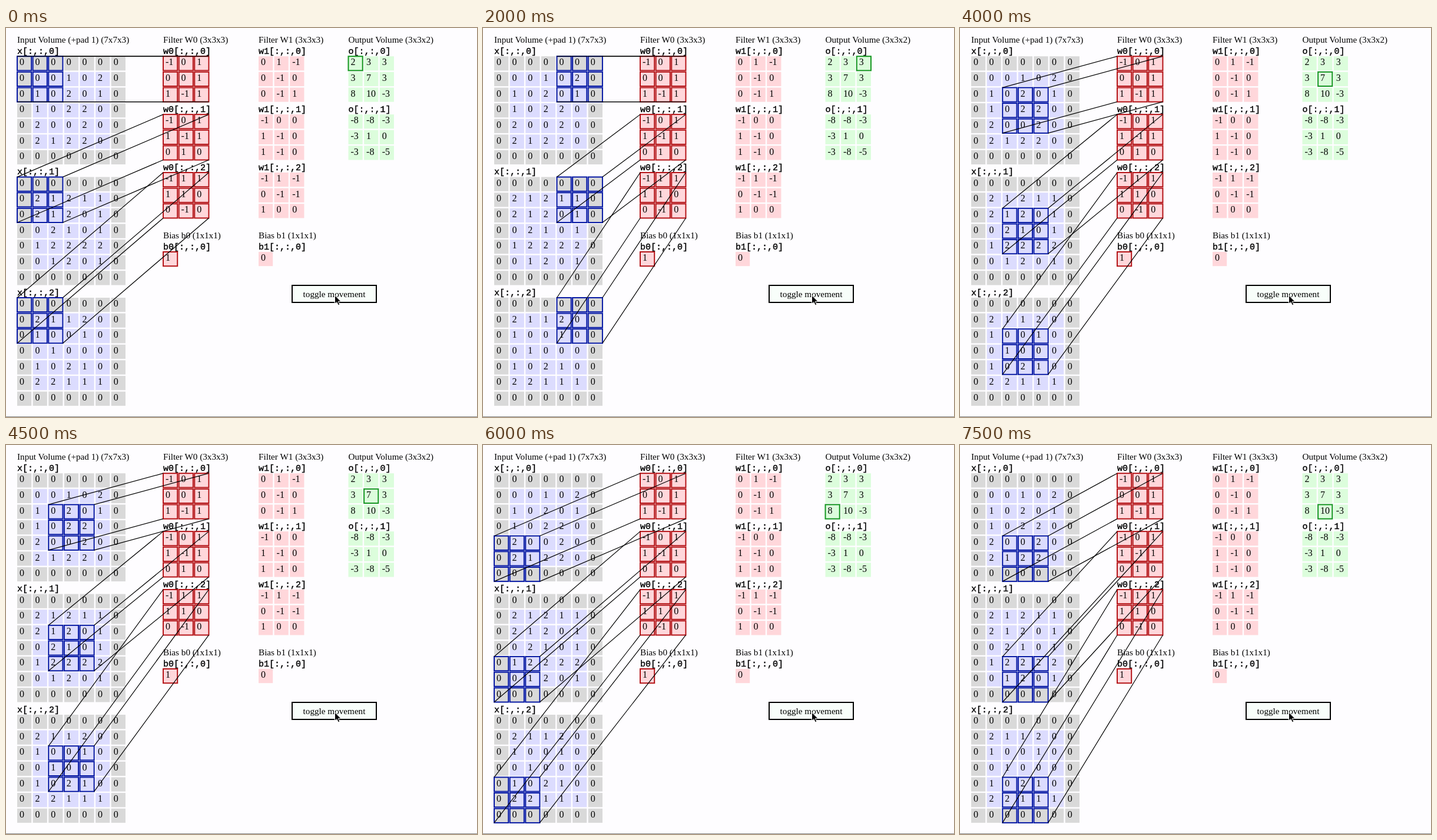
Recreate the animation shown at these times as an HTML page. Size 800 px wide and 662 px high, loop 8 s.

```html
<!DOCTYPE html>
<html lang="en">
<head>
<meta charset="utf-8">
<title>Convolution demo</title>
<style>
  html, body { margin: 0; width: 100%; height: 100%; overflow: hidden; background: #fefdff; }
  svg { display: block; }
  text { font: 15.2px "Liberation Serif", Times, serif; white-space: pre; }
  .num { font-size: 16px; }
  .code { font: 15px "Liberation Mono", Courier, monospace; stroke: #000; stroke-width: .4px; }
  .box { fill: none; stroke-width: 2; }
</style>
</head>
<body>
<svg width="800" height="662" viewBox="0 0 800 662">
  <g id="base"></g>
  <g id="live"></g>
  <rect x="486" y="438" width="143" height="29" fill="#f8fefa" stroke="#000" stroke-width="2"/>
  <text x="557.5" y="458" text-anchor="middle">toggle movement</text>
  <path d="M558.5 455v14.5l3.4-3.2 2.4 5.4 2.5-1.1-2.4-5.2h4.6z" stroke="#fff"/>
  <rect y="661" width="800" height="1" fill="#888"/>
</svg>
<script>
const PITCH = 26.62, CELL = 24.2, GAP = 19.05, TOP = 48.2, STEP = 1000, LOOP = 8000;
const PATCH = 2 * PITCH + CELL;
const GRAY = '#d9d9d9', BLUE = '#dcdcfe', PINK = '#ffd7db', GREEN = '#dcfddc';

// Slices are split by "|", rows by "/"; the input's zero padding is added below.
const parse = s => s.split('|').map(m => m.split('/').map(r => r.trim().split(/\s+/)));
const pad = m => {
  const zeros = Array(7).fill('0');
  return [zeros, ...m.map(r => ['0', ...r, '0']), zeros];
};
const input = parse(
  '0 0 1 0 2/1 0 2 0 1/1 0 2 2 0/2 0 0 2 0/2 1 2 2 0|' +
  '2 1 2 1 1/2 1 2 0 1/0 2 1 0 1/1 2 2 2 2/0 1 2 0 1|' +
  '2 1 1 2 0/1 0 0 1 0/0 1 0 0 0/1 0 2 1 0/2 2 1 1 1').map(pad);
const w0 = parse('-1 0 1/0 0 1/1 -1 1|-1 0 1/1 -1 1/0 1 0|-1 1 1/1 1 0/0 -1 0');
const w1 = parse('0 1 -1/0 -1 0/0 -1 1|-1 0 0/1 -1 0/1 -1 0|-1 1 -1/0 -1 -1/1 0 0');
const out = parse('2 3 3/3 7 3/8 10 -3|-8 -8 -3/-3 1 0/-3 -8 -5');

const X = 19, W0 = 267, W1 = 429, OUT = 581.5, BIAS = 381;
const sliceY = (n, k) => TOP + k * (n * PITCH + GAP);

const text = (x, y, s, cls = '') => `<text x="${x}" y="${y}" class="${cls}">${s}</text>`;
const rect = (x, y, attrs) => `<rect x="${x}" y="${y}" width="${CELL}" height="${CELL}" ${attrs}/>`;
const box = (x, y, color) => rect(x, y, `class="box" stroke="${color}"`);
const line = (x1, y1, x2, y2) =>
  `<path d="M${x1} ${y1}L${x2} ${y2}" stroke="#000" stroke-width="1.2"/>`;

function volume(title, name, x, y, slices, color) {
  let s = text(x, y - 23.2, title);
  slices.forEach((rows, k) => {
    const n = rows.length, top = y + k * (n * PITCH + GAP);
    s += text(x, top - 4.2, `${name}[:,:,${k}]`, 'code');
    rows.forEach((row, i) => row.forEach((v, j) => {
      const cx = x + j * PITCH, cy = top + i * PITCH;
      s += rect(cx, cy, `fill="${color(i, j)}"`) + text(cx + 4, cy + 15.2, v, 'num');
    }));
  });
  return s;
}

function boxes(x, y, color) {
  let s = '';
  for (let k = 0; k < 9; k++) s += box(x + k % 3 * PITCH, y + (k / 3 | 0) * PITCH, color);
  return s;
}

const edge = k => k % 6 === 0;
const pink = () => PINK;
document.getElementById('base').innerHTML =
  volume('Input Volume (+pad 1) (7x7x3)', 'x', X, TOP, input, (i, j) => edge(i) || edge(j) ? GRAY : BLUE) +
  volume('Filter W0 (3x3x3)', 'w0', W0, TOP, w0, pink) +
  volume('Filter W1 (3x3x3)', 'w1', W1, TOP, w1, pink) +
  volume('Output Volume (3x3x2)', 'o', OUT, TOP, out, () => GREEN) +
  volume('Bias b0 (1x1x1)', 'b0', W0, BIAS, parse('1'), pink) +
  volume('Bias b1 (1x1x1)', 'b1', W1, BIAS, parse('0'), pink);

// Highlights and connecting lines for one output cell.
function scene(step) {
  const i = step / 3 | 0, j = step % 3, red = '#b51418';
  let s = box(W0, BIAS, red) + box(OUT + j * PITCH, TOP + i * PITCH, '#149620');
  let lines = '';
  for (let k = 0; k < 3; k++) {
    const x = X + 2 * j * PITCH, y = sliceY(7, k) + 2 * i * PITCH, wy = sliceY(3, k);
    s += boxes(x, y, '#0618a4') + boxes(W0, wy, red);
    for (const dx of [0, PATCH])
      for (const dy of [0, PATCH]) lines += line(x + dx, y + dy, W0 + dx, wy + dy);
  }
  return s + lines;
}

const live = document.getElementById('live');
const start = performance.now();
let shown = -1;
function draw() {
  const step = Math.floor((performance.now() - start) % LOOP / STEP);
  if (step !== shown) live.innerHTML = scene(shown = step);
  requestAnimationFrame(draw);
}
draw();
</script>
</body>
</html>
```
